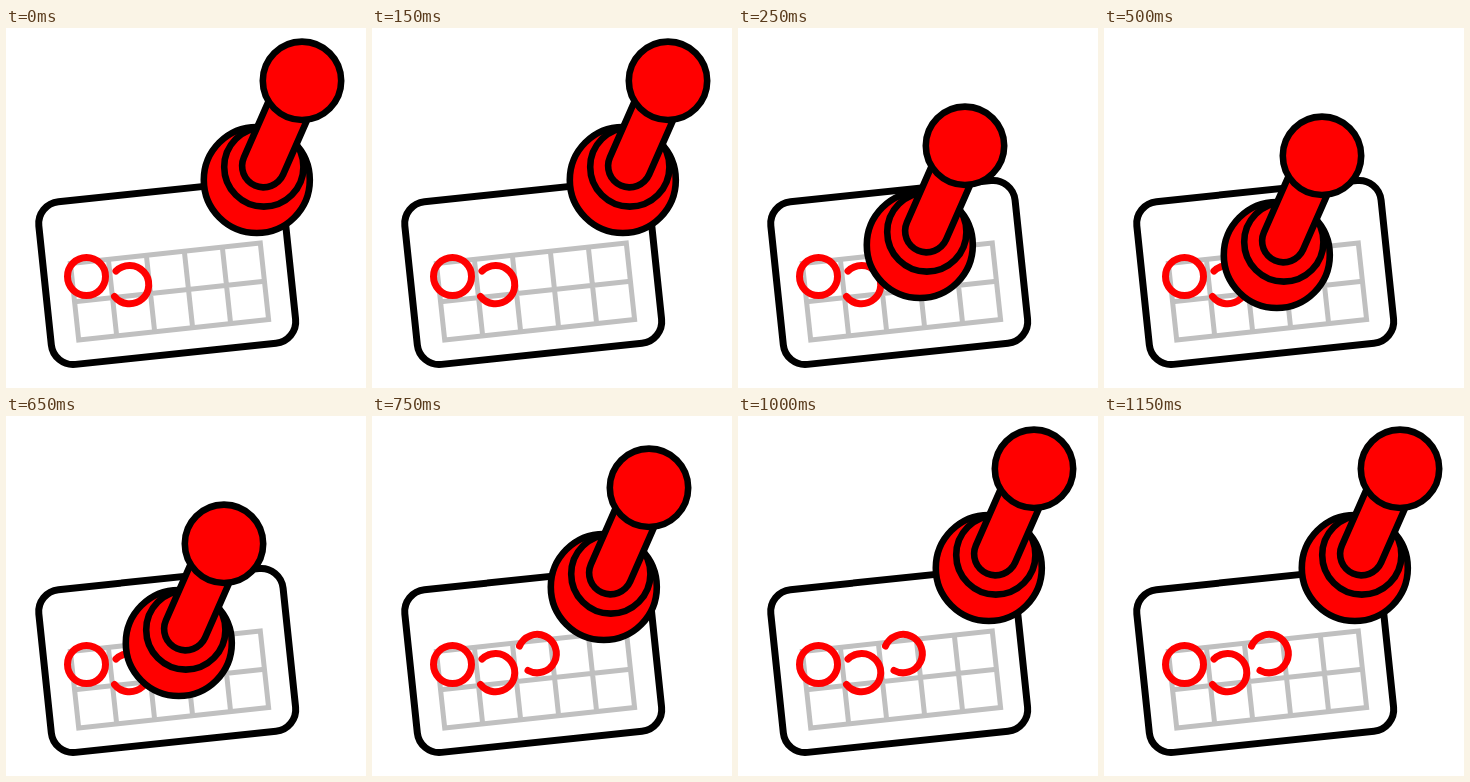
Write an HTML page that moves like this. It is 360 px wide and 360 px high and loops after 1.25 s.

```html
<!DOCTYPE html>
<html lang="en">
<head>
<meta charset="utf-8">
<title>Stamp card</title>
<style>
  html, body { margin: 0; width: 100%; height: 100%; overflow: hidden; background: #fff; }
  svg { display: block; width: 360px; height: 360px; }
  .ink { fill: none; stroke: #f00; stroke-width: 7; stroke-linecap: round; }
  .part { fill: #f00; stroke: #000; stroke-width: 6.6; }
  .grid { fill: none; stroke: #c0c0c0; stroke-width: 5; }
</style>
</head>
<body>
<svg viewBox="0 0 360 360">
  <rect x="-122.8" y="-81.8" width="245.6" height="163.6" rx="22"
        transform="translate(161.2 244.5) rotate(-6)" fill="#fff" stroke="#000" stroke-width="7"/>
  <g class="grid" transform="translate(163.5 263.5) rotate(-6.2)">
    <rect x="-95.5" y="-38.5" width="191" height="77"/>
    <path d="M-95.5 0h191M-57.3 -38.5v77M-19.1 -38.5v77M19.1 -38.5v77M57.3 -38.5v77"/>
  </g>
  <g class="ink">
    <circle cx="80.5" cy="248.5" r="19"/>
    <path d="M110 243A19.2 19.2 0 1 1 108.5 268.5"/>
    <path id="fresh" d="M147.5 230A19.2 19.2 0 1 1 156 254.5"/>
  </g>
  <g id="stamp">
    <circle class="part" cx="250.8" cy="152" r="53"/>
    <circle class="part" cx="257.8" cy="139" r="39.6"/>
    <g stroke-linecap="round">
      <path d="M257.5 138L294 55" stroke="#000" stroke-width="49.4"/>
      <path d="M257.5 138L294 55" stroke="#f00" stroke-width="36.2"/>
    </g>
    <circle class="part" cx="296" cy="52.8" r="39.2"/>
  </g>
</svg>
<script>
  const STEP = 250;
  // Stamp offset from rest, and whether the new mark is on the card
  const poses = [
    [0, 0, false],
    [-69, 65, false],
    [-78, 75, true],
    [-19, 19, true],
    [0, 0, true]
  ];
  const stamp = document.getElementById('stamp');
  const fresh = document.getElementById('fresh');

  function draw(time) {
    const [x, y, marked] = poses[Math.floor(time / STEP) % poses.length];
    stamp.setAttribute('transform', `translate(${x} ${y})`);
    fresh.setAttribute('visibility', marked ? 'visible' : 'hidden');
  }

  const start = performance.now();
  function tick() {
    draw(performance.now() - start);
    requestAnimationFrame(tick);
  }
  tick();
</script>
</body>
</html>
```
